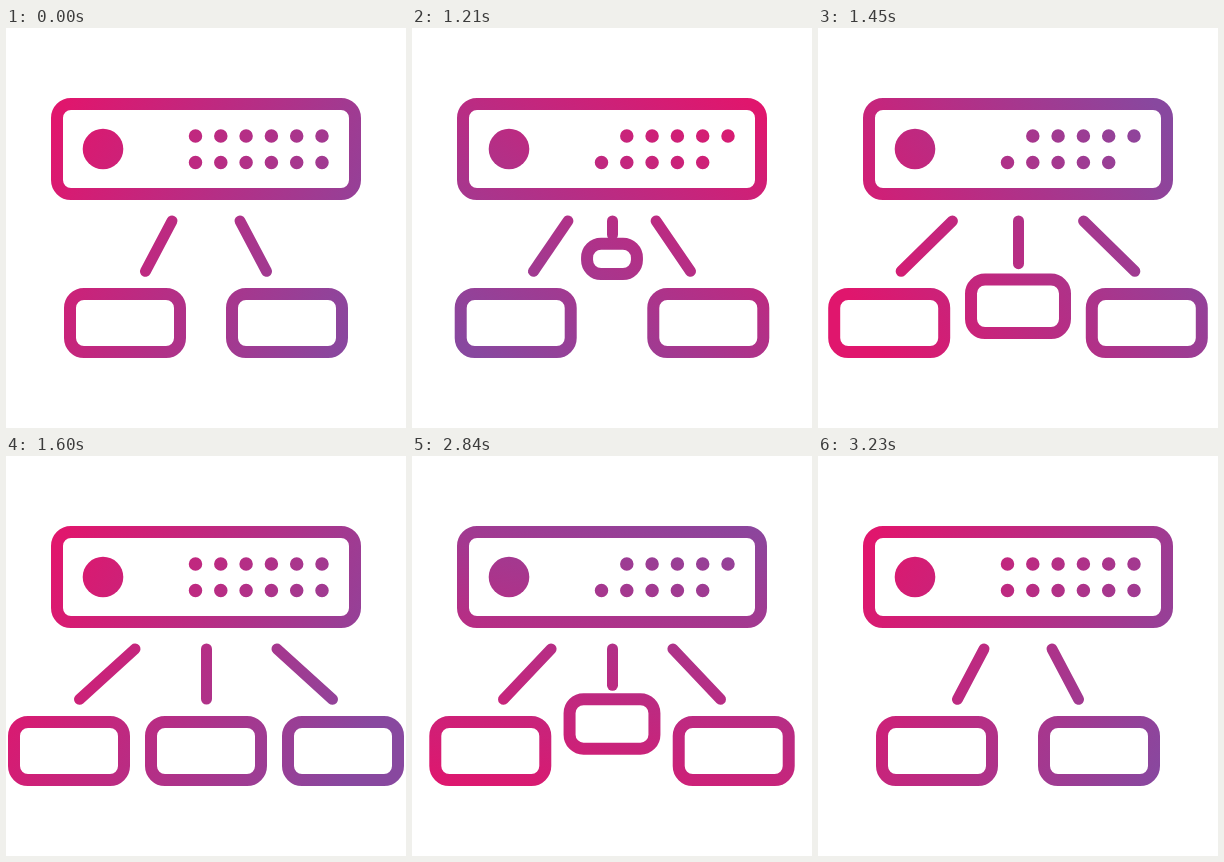
These frames come from a looping animation (400x400 px, 3260 ms). An HTML page without scripts:

```html
<!DOCTYPE html>
<html lang="en">
<head>
<meta charset="utf-8">
<title>Network switch</title>
<style>
  @property --u { syntax: "<number>"; inherits: true; initial-value: 0; }

  html, body { margin: 0; height: 100%; overflow: hidden; background: #fff; }

  svg {
    display: block; width: 100vw; height: 100vh;
    /* u: stepped time, p: eased progress, s: fast-start progress */
    --p: calc((1 - cos(var(--u) * 180deg)) / 2);
    --s: sin(var(--u) * 90deg);
    animation: run 3.26s infinite;
  }
  @keyframes run {
    0%      { --u: 0; }
    30.674% { --u: 0; animation-timing-function: steps(20); }
    49.079% { --u: 1; }
    80.674% { --u: 1; animation-timing-function: steps(20); }
    99.079%, 100% { --u: 0; }
  }

  .paint {
    transform-origin: 200px 200px;
    transform: rotate(calc(25deg + 360deg * var(--p)));
  }

  .box { fill: none; stroke: #fff; stroke-width: 12; rx: 14px; ry: 14px; }
  .outer { x: calc(64px - 56px * var(--p)); }
  .new {
    --w: calc(44px * var(--u) + 66px * var(--s));
    width: var(--w);
    height: calc(58px * var(--s));
    x: calc(200px - var(--w) / 2);
    y: calc(193px + 36.5px * (var(--p) + var(--u)));
  }
  .middle { opacity: calc(var(--u) * 100); }

  .cable { x: -5.5px; y: -5.5px; width: 11px; rx: 5.5px; ry: 5.5px; fill: #fff; }
  .slanted {
    --a: atan2(26.5 + 29 * var(--p), 50.3);
    height: calc(11px + 50.3px / cos(var(--a)));
    transform: translate(calc(166px - 37px * var(--p)), 193px) rotate(var(--a));
  }
  .straight {
    height: calc(11px + 50px * var(--p));
    transform: translate(200.5px, 193px);
  }

  .leds { fill: none; stroke: #fff; stroke-width: 13.5; stroke-linecap: round; stroke-dasharray: 0 25.3; }
  .off { fill: #000; opacity: 0; animation: 3.26s step-end infinite; }
  .first { animation-name: first; }
  .fourth { animation-name: fourth; }
  .last { animation-name: last; }
  @keyframes first {
    0%, 45.3%, 98.15% { opacity: 0; }
    35.2%, 85.2% { opacity: 1; }
  }
  @keyframes fourth {
    0%, 43.5% { opacity: 0; }
    39.8% { opacity: 1; }
  }
  @keyframes last {
    0%, 46.3%, 95.3% { opacity: 0; }
    37.1%, 87.1% { opacity: 1; }
  }
</style>
</head>
<body>
<svg viewBox="0 0 400 400">
  <defs>
    <linearGradient id="tint" gradientUnits="userSpaceOnUse" x1="20" y1="0" x2="380" y2="0">
      <stop offset="0" stop-color="#e0166d"/>
      <stop offset="1" stop-color="#88489f"/>
    </linearGradient>

    <mask id="art" maskUnits="userSpaceOnUse" x="0" y="0" width="400" height="400">
      <rect class="box" x="51" y="76" width="298" height="90"/>
      <circle cx="97" cy="121" r="20.3" fill="#fff"/>
      <path class="leds" d="M189.5 108H317M189.5 134.5H317"/>
      <circle class="off first" cx="189.5" cy="108" r="8"/>
      <circle class="off fourth" cx="265.4" cy="108" r="8"/>
      <circle class="off last" cx="316" cy="134.5" r="8"/>

      <g id="side">
        <rect class="cable slanted"/>
        <rect class="box outer" y="266" width="110" height="58"/>
      </g>
      <use href="#side" transform="matrix(-1 0 0 1 400 0)"/>

      <g class="middle">
        <rect class="cable straight"/>
        <rect class="box new"/>
      </g>
    </mask>
  </defs>

  <g mask="url(#art)">
    <rect class="paint" x="-150" y="-150" width="700" height="700" fill="url(#tint)"/>
  </g>
</svg>
</body>
</html>
```
